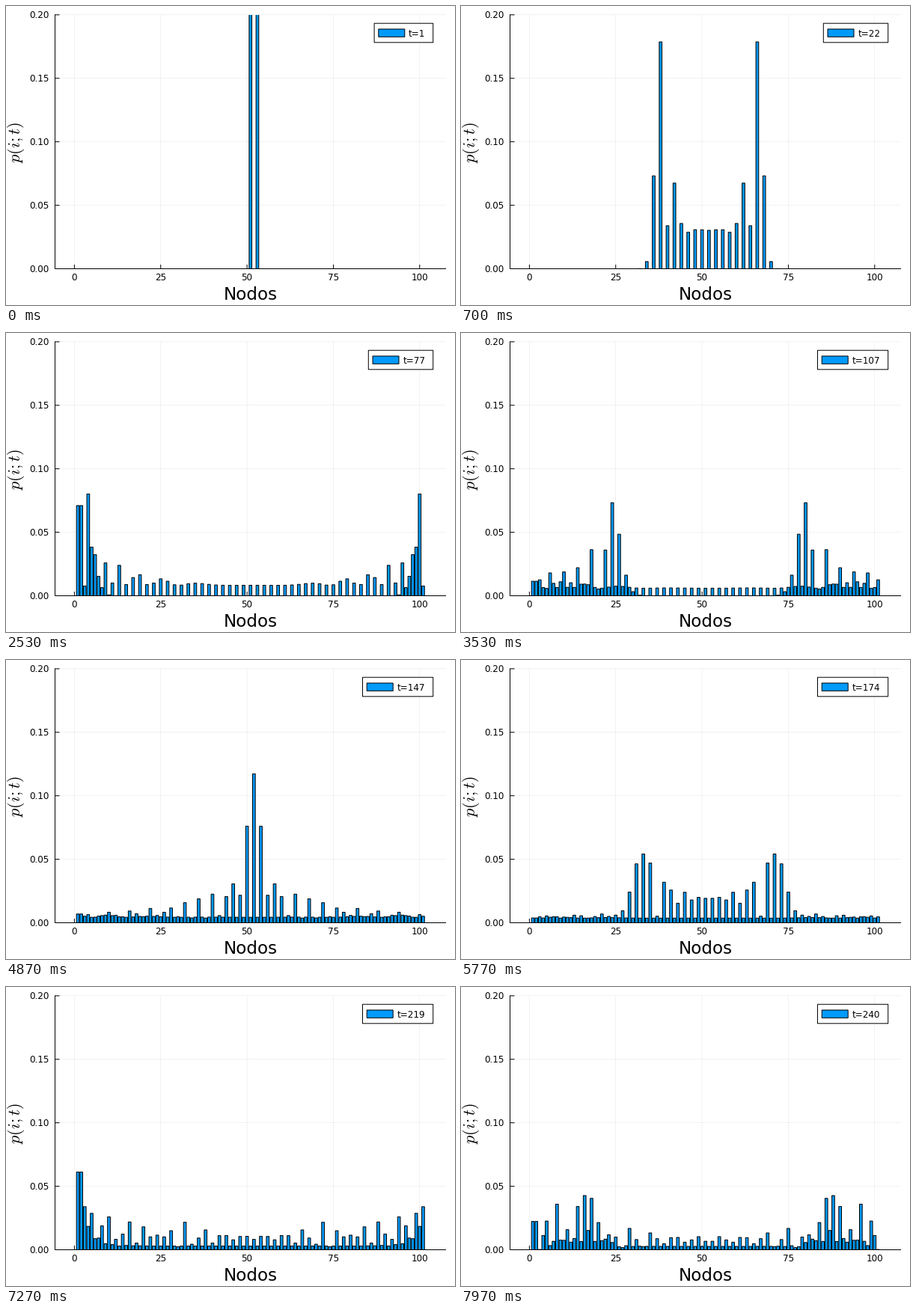
Write a matplotlib script that moves like this. It is 600 px wide and 400 px high and loops after 8 s.

```python
import numpy as np
import matplotlib.pyplot as plt
from matplotlib.animation import FuncAnimation
from matplotlib.collections import PolyCollection
from matplotlib.patches import Rectangle

W, H, DPI = 600, 400, 100
PX = 72 / DPI                     # one pixel in points
NODES, START, STEPS = 101, 52, 240
LOOP, TICK = 8000, 20             # ms
LEFT, RIGHT, TOP, BOTTOM = 65.5, 588, 11.8, 351.5
BLUE = "#009afa"

plt.rcParams["font.family"] = "DejaVu Sans"
plt.rcParams["mathtext.fontset"] = "cm"


def x_px(node):
    return 91.4 + 4.614 * node


def y_px(p):
    return BOTTOM - (BOTTOM - TOP) * p / 0.2


def hadamard_walk():
    """Probabilities of a coined quantum walk on a cycle, one row per step."""
    left = np.zeros(NODES, complex)
    right = np.zeros(NODES, complex)
    left[START - 1] = 1 / np.sqrt(2)
    right[START - 1] = 1j / np.sqrt(2)
    rows = []
    for _ in range(STEPS):
        left, right = (left + right) / np.sqrt(2), (left - right) / np.sqrt(2)
        left, right = np.roll(left, -1), np.roll(right, 1)
        rows.append(abs(left) ** 2 + abs(right) ** 2)
    return np.array(rows)


prob = hadamard_walk()

fig = plt.figure(figsize=(W / DPI, H / DPI), dpi=DPI, facecolor="white")
ax = fig.add_axes([0, 0, 1, 1])
ax.set_xlim(0, W)
ax.set_ylim(H, 0)
ax.axis("off")


def line(xs, ys, width=1, alpha=1):
    ax.plot(xs, ys, color="black", lw=width * PX, alpha=alpha, zorder=2,
            solid_capstyle="butt", snap=False)


def label(x, y, s, size=12, **kw):
    return ax.text(x, y, s, fontsize=size * PX, color="black",
                   va="baseline", **kw)


def box(x, y, w, h, color, z):
    patch = Rectangle((x, y), w, h, fc=color, ec="black", lw=PX, zorder=z,
                      snap=False)
    return ax.add_patch(patch)


# Grid, ticks and tick labels
for node in range(0, 101, 25):
    x = x_px(node)
    line([x, x], [TOP, BOTTOM], 0.5, 0.1)
    line([x, x], [BOTTOM, BOTTOM - 5.5])
    label(x, 367.3, str(node), ha="center")
for p in np.linspace(0, 0.2, 5):
    y = y_px(p)
    line([LEFT, RIGHT], [y, y], 0.5, 0.1)
    line([LEFT, LEFT + 6], [y, y])
    label(57.3, y + 4.4, f"{p:.2f}", ha="right")
line([LEFT, LEFT], [TOP - 0.5, BOTTOM + 0.5])
line([LEFT - 0.5, RIGHT], [BOTTOM, BOTTOM])

label(326.5, 392.8, "Nodos", 23, ha="center")
label(19, 182.2, "$p(i;t)$", 22.4, ha="center", rotation=90,
      rotation_mode="anchor")

# Bars
bars = PolyCollection([], facecolors=BLUE, edgecolors="black",
                      linewidths=PX, zorder=3)
bars.set_snap(False)
bars.set_joinstyle("miter")
ax.add_collection(bars, autolim=False)
plot_area = Rectangle((LEFT, TOP), RIGHT - LEFT, BOTTOM + 0.5 - TOP,
                      transform=ax.transData)
bars.set_clip_path(plot_area)

# Legend
LEGEND_RIGHT = 570.7
legend_box = box(492, 23.2, 79, 25.6, "white", 5)
swatch = box(498, 30.9, 35, 10.4, BLUE, 6)
legend_text = label(538, 40.6, "t=1", zorder=6)

nodes = np.arange(1, NODES + 1)
x0, x1 = x_px(nodes - 0.4), x_px(nodes + 0.4)
base = np.full(NODES, BOTTOM)


def update(i):
    # a step starts at its time rounded to 10 ms
    ms = i * TICK + TICK / 2 + 5
    step = min(int(ms * STEPS / LOOP), STEPS - 1)
    top = y_px(prob[step])
    corners = [(x0, base), (x0, top), (x1, top), (x1, base)]
    bars.set_verts(np.array(corners).transpose(2, 0, 1))

    t = str(step + 1)
    edge = 499.9 - 7.8 * len(t)
    legend_box.set_x(edge)
    legend_box.set_width(LEGEND_RIGHT - edge)
    swatch.set_x(edge + 5.7)
    legend_text.set_x(edge + 46)
    legend_text.set_text("t=" + t)
    return bars, legend_box, swatch, legend_text


anim = FuncAnimation(fig, update, frames=LOOP // TICK,
                     init_func=lambda: update(0), interval=TICK, repeat=True,
                     repeat_delay=0, cache_frame_data=False)
plt.show()
```
